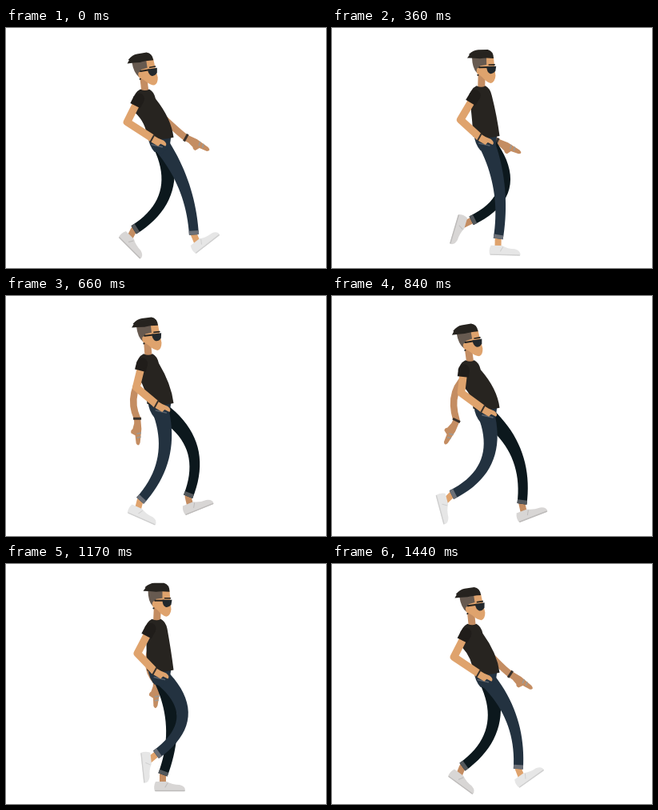
Animation of 400 by 300 pixels, one loop 1470 ms. Source, as an HTML page:

```html
<!DOCTYPE html>
<html lang="en">
<head>
<meta charset="utf-8">
<title>Walk cycle</title>
<style>
html, body { margin: 0; width: 100%; height: 100%; overflow: hidden; background: #fff; }
svg { display: block; width: 100vw; height: 100vh; }
.line { fill: none; stroke-linecap: round; stroke-linejoin: round; }
.flat { fill: none; stroke-linecap: butt; }
</style>
</head>
<body>
<svg id="stage" viewBox="0 0 400 300"></svg>
<script>
const LOOP = 1470, STEP = 30, LEG = 124;
const SKIN = '#dfa36d', SHADE = '#c48d62', BLACK = '#26231f';
const SHIRT = '#272420', SLEEVE = '#201d1a', JEANS = '#233240', JEANS_FAR = '#0c181d';

// One stride, used by both legs half a loop apart: time, shoe x, y, angle.
const stride = [
  [0, 239, 268, -38],
  [100, 240, 270, -22],
  [220, 228, 273, 0],
  [555, 178, 273, 2],
  [660, 165, 266, 24],
  [840, 142, 256, 75],
  [945, 137, 250, 97],
  [1050, 156, 246, 116],
  [1290, 204, 247, 38],
  [1395, 230, 261, -22]
];

// Smooth periodic interpolation through the keys.
function sample(keys, t) {
  const n = keys.length;
  const at = i => keys[(i + n) % n];
  const time = i => at(i)[0] + LOOP * Math.floor(i / n);
  let i = n - 1;
  while (keys[i][0] > t) i--;
  const [t0, t1, t2, t3] = [i - 1, i, i + 1, i + 2].map(time);
  const d = t2 - t1, u = (t - t1) / d, u2 = u * u, u3 = u2 * u;
  return at(i).slice(1).map((p, k) => {
    const a = at(i - 1)[k + 1], q = at(i + 1)[k + 1], b = at(i + 2)[k + 1];
    const m = (q - a) / (t2 - t0) * d, w = (b - p) / (t3 - t1) * d;
    return p * (2 * u3 - 3 * u2 + 1) + m * (u3 - 2 * u2 + u)
         + q * (3 * u2 - 2 * u3) + w * (u3 - u2);
  });
}

// Cosine that peaks at the given time, so many times per loop.
const wave = (t, peak, beats) => Math.cos(2 * Math.PI * beats * (t - peak) / LOOP);

const stage = document.getElementById('stage');
function make(tag, attrs, parent = stage) {
  const el = document.createElementNS('http://www.w3.org/2000/svg', tag);
  for (const k in attrs) el.setAttribute(k, attrs[k]);
  return parent.appendChild(el);
}
const fill = (color, d, parent) => make('path', { fill: color, d: d || '' }, parent);
const line = (color, width, d, parent, kind = 'line') =>
  make('path', { class: kind, stroke: color, 'stroke-width': width, d: d || '' }, parent);
const setD = (el, d) => el.setAttribute('d', d);
const place = (el, x, y, a) =>
  el.setAttribute('transform', `translate(${x.toFixed(2)} ${y.toFixed(2)}) rotate(${a.toFixed(2)})`);
const pt = p => p[0].toFixed(2) + ' ' + p[1].toFixed(2);
const off = (p, x, y) => [p[0] + x, p[1] + y];
const mix = (a, b, u) => [a[0] + (b[0] - a[0]) * u, a[1] + (b[1] - a[1]) * u];
const turn = (x, y, deg) => {
  const a = deg * Math.PI / 180, c = Math.cos(a), s = Math.sin(a);
  return [x * c - y * s, x * s + y * c];
};
// Control point of a quadratic that passes through m halfway.
const bend = (a, m, b) => [2 * m[0] - (a[0] + b[0]) / 2, 2 * m[1] - (a[1] + b[1]) / 2];

function makeLeg(color, skin, cuffColor, shoeColor, soleColor) {
  const ankle = line(skin, 8);
  const shoe = make('g', {});
  fill(shoeColor, 'M-9 -2 L5 -2 Q12 2 21 2 Q29 4 28 10 L-10 10 Q-12 4 -9 -2Z', shoe);
  line(soleColor, 1.4, 'M-9 9.5 L27 9.5', shoe);
  line(soleColor, 1, 'M6 0 L3 5', shoe);
  const cloth = fill(color);
  const cuff = line(cuffColor, 12, '', stage, 'flat');
  return (hip, t) => {
    const [sx, sy, angle] = sample(stride, t % LOOP);
    const end = off(turn(0, -10.5, angle * 0.6), sx, sy);
    // The leg keeps its length, so a shorter reach bows the knee forward.
    const dx = end[0] - hip[0], dy = end[1] - hip[1], d = Math.hypot(dx, dy);
    const bow = Math.sqrt(0.375 * d * Math.max(0, LEG - d)) / d;
    const c = bend(hip, off(mix(hip, end, 0.5), dy * bow, -dx * bow), end);
    const left = [], right = [], N = 20;
    for (let i = 0; i <= N; i++) {
      const s = i / N, a = mix(hip, c, s), b = mix(c, end, s), p = mix(a, b, s);
      const ux = b[0] - a[0], uy = b[1] - a[1];
      const r = (12 + 9 * (1 - s) ** 2) / 2 / Math.hypot(ux, uy);
      left.push(pt(off(p, -uy * r, ux * r)));
      right.unshift(pt(off(p, uy * r, -ux * r)));
    }
    setD(cloth, 'M' + left.concat(right).join('L') + 'Z');
    setD(cuff, `M${pt(mix(end, c, 5 / Math.hypot(end[0] - c[0], end[1] - c[1])))}L${pt(end)}`);
    setD(ankle, `M${pt(end)}L${pt([sx, sy])}`);
    place(shoe, sx, sy, angle);
  };
}

// Parts, back to front.
const farArm = line(SHADE, 8.5);
const farHand = make('g', {});
fill(SHADE, 'M-2 -4 L13 -5 L30 -3 Q36 -1 31 2 L21 3 L18 8 Q15 9 13 6 L6 4 L-2 4Z', farHand);
line('#9c9a96', 1.6, 'M18 -4.5 L19 1 M23 -4 L24 1', farHand, 'flat');
line('#38312c', 3, 'M0 -5 L0 5', farHand, 'flat');
const drawFarLeg = makeLeg(JEANS_FAR, SHADE, '#53585c', '#d8d6d5', '#bdbbba');
const drawNearLeg = makeLeg(JEANS, SKIN, '#6b7078', '#e6e6e6', '#cfcfcf');
const seat = fill(JEANS);
const neck = line(SHADE, 9, '', stage, 'flat');
const shirt = fill(SHIRT);
const head = make('g', {});
fill(SKIN, 'M-9 -14 L13 -14 L14 0 L15 10 Q14 18 9 19 Q4 18 -2 11 L-8 6Z', head);
fill('#675a50', 'M-14 -14 L4 -14 L4 -4 L-4 -3 L-5 3 L-8 6 Q-14 0 -14 -14Z', head);
make('ellipse', { cx: -6, cy: 3.5, rx: 2.6, ry: 4, fill: SKIN }, head);
make('circle', { cx: -7, cy: 8.5, r: 1.1, fill: BLACK }, head);
fill(BLACK, 'M-20 -13 L-17 -17 L-18 -17.5 Q-12 -23 -6 -23 L6 -23 Q13 -21 13 -12 Q2 -13 -4 -12 Q-12 -13 -20 -13Z', head);
line(BLACK, 1.6, 'M7 -4 L14 -4', head);
line(BLACK, 2, 'M-5 -1 L6 -1', head);
fill('#22282c', 'M4 -2 L16 -2 L15 4 Q12 8 8 7 Q4 5 4 -2Z', head);
const pocket = line('#59616b', 1.6);
const nearArm = line(SKIN, 9.5);
const nearHand = fill(SKIN);
const band = line('#38312c', 2, '', stage, 'flat');
const sleeve = line(SLEEVE, 14, '', stage, 'flat');
const cap = make('circle', { r: 7, fill: SLEEVE });

function draw(t) {
  // The body leans and bobs twice per loop; the arms swing once.
  const lean = wave(t, 440, 2), swing = wave(t, 90, 1);
  const hx = 181.5 + 10 * lean, hy = 52 - 6.5 * wave(t, 510, 2), tilt = 5 * lean - 5;
  const N = off(turn(-3, 23, tilt), hx, hy);
  const H = [192.5, 135.8 - 4.5 * wave(t, 525, 2)];
  const n = (x, y) => pt(off(N, x, y)), h = (x, y) => pt(off(H, x, y));

  place(head, hx, hy, tilt);
  setD(neck, `M${pt([hx - 2, hy + 4])}L${n(0, 3)}`);
  setD(shirt, `M${n(-6, -1)}Q${n(0, 2)} ${n(5, -1)}Q${n(11, 2)} ${n(13, 11)}` +
    `Q${h(14, -24)} ${h(17, 0)}Q${h(2, 4)} ${h(-16, 1)}` +
    `Q${h(-17, -18)} ${n(-13, 28)}L${n(-14, 12)}Q${n(-14, 3)} ${n(-6, -1)}Z`);
  setD(seat, `M${h(-15, -2)}L${h(14, -2)}L${h(12, 12)}L${h(2, 20)}L${h(-7, 18)}Q${h(-14, 10)} ${h(-15, -2)}Z`);

  drawFarLeg(off(H, 2, 10), t + LOOP / 2);
  drawNearLeg(off(H, 0, 7), t);

  const back = off(N, 1, 14), elbow = [181 + 27 * swing, 121];
  const wrist = [191.5 + 36 * swing, 146 - 9.5 * swing];
  setD(farArm, `M${pt(back)}Q${pt(bend(back, elbow, wrist))} ${pt(wrist)}`);
  place(farHand, ...wrist, 66 - 54 * wave(t, 190, 1));

  const S = off(N, -8, 11), W = off(H, -8.5 - 3 * swing, 0);
  const E = off(mix(S, W, 0.5), -18.5 - 4 * swing, 5);
  const w = (x, y) => pt(off(W, x, y));
  setD(nearArm, `M${pt(S)}L${pt(E)}L${pt(W)}`);
  setD(nearHand, `M${w(-1, -5)}L${w(9, 1)}L${w(16, 4)}Q${w(21, 8)} ${w(18, 11)}` +
    `L${w(12, 8)}L${w(9, 11)}L${w(-3, 4)}Z`);
  setD(pocket, `M${w(1, 9)}L${w(14, 12)}`);
  setD(band, `M${w(4, -3)}L${w(-1, 6)}`);
  setD(sleeve, `M${pt(S)}L${pt(mix(S, E, 0.3))}`);
  cap.setAttribute('cx', S[0]);
  cap.setAttribute('cy', S[1]);
}

const start = performance.now();
function tick() {
  const t = Math.max(0, performance.now() - start);
  draw(Math.floor(t / STEP) * STEP % LOOP);
  requestAnimationFrame(tick);
}
tick();
</script>
</body>
</html>
```
